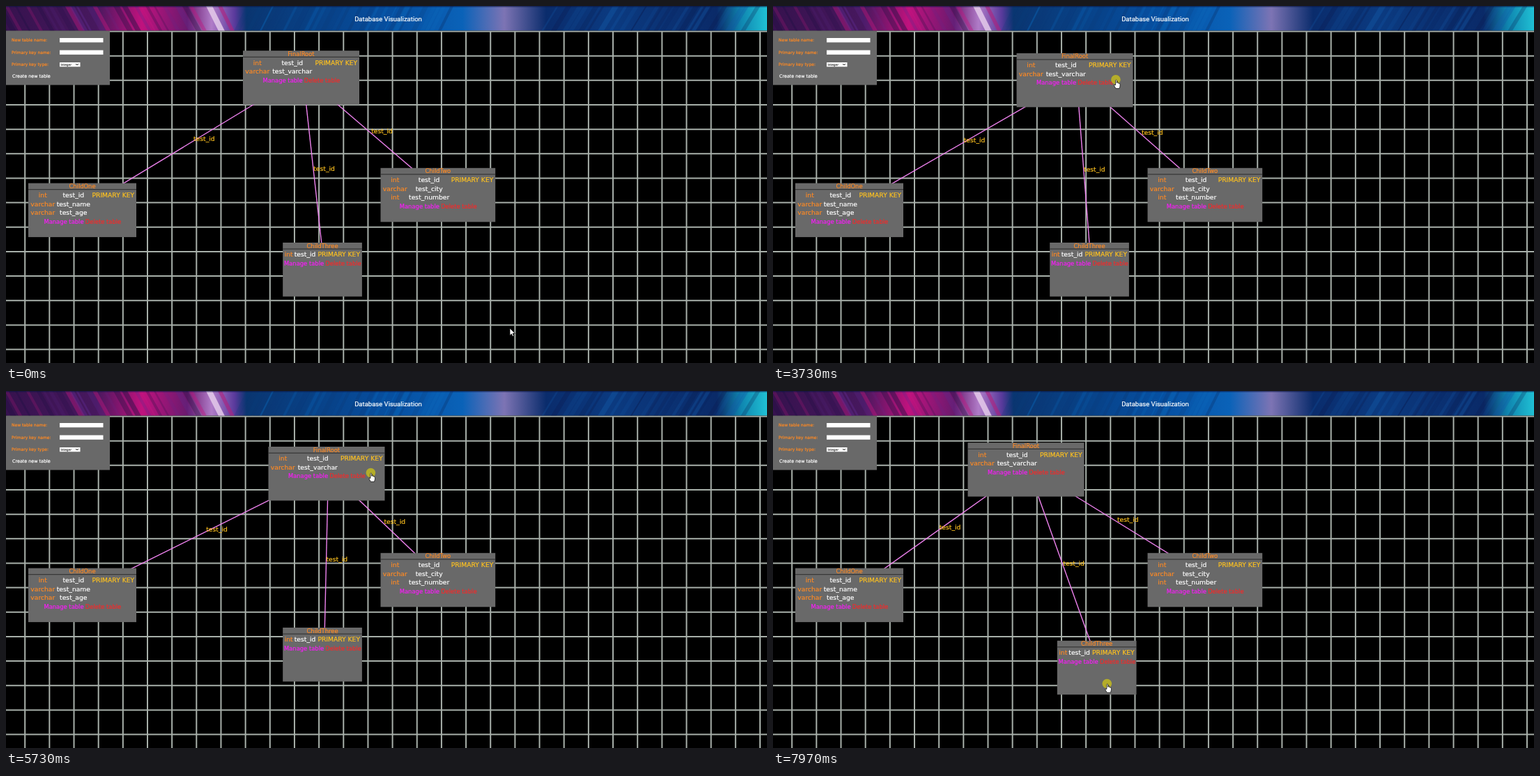
Recreate the animation shown at these times as an HTML page. Size 1092 by 513 pixels, loop 8 s.

```html
<!DOCTYPE html>
<html lang="en">
<head>
<meta charset="utf-8">
<title>Database Visualization</title>
<style>
  html, body { margin: 0; width: 100%; height: 100%; overflow: hidden; background: #000; }
  svg { display: block; width: 1092px; height: 513px; font: 9.2px "DejaVu Sans", sans-serif; }
  text { stroke-width: 0.2px; }
  .title { font: 9.5px Roboto, sans-serif; }
  .small { font-size: 6px; }
  .create { font-size: 6.4px; }
  .option { font-size: 4.3px; }
  .head, .button { font-size: 8.4px; }
  .mid { text-anchor: middle; }
</style>
</head>
<body>
<svg id="stage" viewBox="0 0 1092 513"></svg>
<script>
const NS = 'http://www.w3.org/2000/svg';
const LOOP = 8000, STEP = 70, HEIGHT = 77.5;
const ORANGE = '#ff8a24', GOLD = '#ffc21f', GREY = '#696969';
const stage = document.getElementById('stage');

function add(parent, tag, attrs = {}, text) {
  const el = document.createElementNS(NS, tag);
  for (const k in attrs) el.setAttribute(k, attrs[k]);
  if (text) el.textContent = text;
  parent.append(el);
  return el;
}
const rect = (p, x, y, width, height, fill, more) =>
  add(p, 'rect', { x, y, width, height, fill, ...more });
const label = (p, x, y, text, fill, cls = 'mid') =>
  add(p, 'text', { x, y, fill, stroke: fill, class: cls }, text);

function drawGrid() {
  const gap = 35.16;
  let d = '';
  for (let x = 27.2; x < 1092; x += gap) d += `M${x} 36V513`;
  for (let y = 36.5; y < 513; y += gap) d += `M0 ${y}H1092`;
  add(stage, 'path', { d, stroke: '#a8b0aa', 'stroke-width': 2 });
}

function drawBanner() {
  const stops = {
    0: '#36124e', 130: '#47185e', 195: '#c0127e', 260: '#6a1a6e', 295: '#b07cc8',
    328: '#5a3a9c', 345: '#0a3570', 560: '#0650a2', 655: '#0a62b8', 715: '#7d74b4',
    775: '#0a2c6c', 870: '#0b3a80', 1020: '#0a2a68', 1055: '#0f86b0', 1092: '#20c0d4'
  };
  const defs = add(stage, 'defs');
  const grad = add(defs, 'linearGradient', { id: 'sky' });
  for (const x in stops) add(grad, 'stop', { offset: x / 1092, 'stop-color': stops[x] });
  rect(add(defs, 'clipPath', { id: 'top' }), 0, 0, 1092, 35.6);
  const g = add(stage, 'g', { 'clip-path': 'url(#top)' });
  rect(g, 0, 0, 1092, 35.6, 'url(#sky)');

  const streak = (x, w, lean, fill, opacity) =>
    add(g, 'path', { d: `M${x} 0h${w}l${lean} 36h${-w}z`, fill, opacity });
  let seed = 11;
  const rnd = () => (seed = (seed * 16807) % 2147483647) / 2147483647;
  function scatter(from, to, lean, ...colors) {
    for (let x = from; x < to; x += 6 + rnd() * 12)
      streak(x, 2 + rnd() * 7, lean, colors[Math.floor(rnd() * colors.length)], 0.15 + rnd() * 0.3);
  }
  scatter(-20, 275, 20, '#c0187f', '#1b1040', '#5c2a8c');
  scatter(345, 650, -18, '#0a3a78', '#0a66b8');
  scatter(790, 1090, -22, '#0a1c50', '#1458a4');
  streak(287, 9, 18, '#e4cbea', 0.85);
  streak(304, 6, 18, '#b0207c', 0.6);
  rect(g, 0, 0, 1092, 1.5, '#0a1440', { opacity: 0.6 });
  label(stage, 548.5, 22.3, 'Database Visualization', '#fff', 'mid title');
}

function drawForm() {
  rect(stage, 0, 36, 149, 77.5, GREY);
  ['name', 'key name', 'key type'].forEach((text, i) => {
    const y = 46 + i * 17.5;
    label(stage, 8, y + 5, (i ? 'Primary ' : 'New table ') + text + ':', ORANGE, 'small');
    rect(stage, 77, y, i < 2 ? 62.5 : 29.5, 6.3, '#fff');
  });
  label(stage, 78.5, 85.8, 'Integer', '#555', 'option');
  add(stage, 'path', { d: 'M100.2 83l1.8 1.9 1.8-1.9', fill: 'none', stroke: '#111' });
  label(stage, 9, 102.7, 'Create new table', '#fff', 'create');
}

const tables = {
  root: { name: 'FinalRoot', w: 167, rows: ['int test_id', 'varchar test_varchar'] },
  one: { name: 'ChildOne', x: 32, y: 254.6, w: 155,
    rows: ['int test_id', 'varchar test_name', 'varchar test_age'] },
  two: { name: 'ChildTwo', x: 537.5, y: 232.8, w: 164.7,
    rows: ['int test_id', 'varchar test_city', 'int test_number'] },
  three: { name: 'ChildThree', w: 113.7, rows: ['int test_id'] }
};

function drawTable(t) {
  const g = t.el = add(stage, 'g');
  const mid = t.w / 2;
  const typeX = t.rows.length > 1 ? 20.8 : 8.5;
  const nameX = typeX + t.w / 2 - 33.5;
  rect(g, 0, 0, t.w, HEIGHT, GREY);
  rect(g, 0, 8.6, t.w, 1, '#2c2c2c');
  label(g, mid, 7.6, t.name, ORANGE, 'mid head');
  label(g, t.w - 33.2, 20.4, 'PRIMARY KEY', GOLD);
  let y = 20.4;
  for (const row of t.rows) {
    const [type, name] = row.split(' ');
    label(g, typeX, y, type, ORANGE);
    label(g, nameX, y, name, '#fff');
    y += 12.6;
  }
  label(g, mid - 26.5, y - 0.2, 'Manage table', '#f81cf8', 'mid button');
  label(g, mid + 30, y - 0.2, 'Delete table', '#f52a2a', 'mid button');
}

drawGrid();
const links = ['one', 'two', 'three'].map(key => ({
  to: tables[key],
  line: add(stage, 'line', { stroke: '#ee82ee', 'stroke-width': 1.4 }),
  text: label(stage, 0, 0, 'test_id', GOLD, '')
}));
drawBanner();
drawForm();
Object.values(tables).forEach(drawTable);

const press = add(stage, 'circle', { r: 6.8, fill: '#c4bc1c', opacity: 0.82 });
const ink = { fill: '#fff', stroke: '#000', 'stroke-width': 0.7, 'stroke-linejoin': 'round' };
const arrow = add(stage, 'path', { d: 'M0 0V10.4L2.4 8.2L4 11.8L5.7 11L4.2 7.6H7.4Z', ...ink });
const hand = add(stage, 'path', {
  d: 'M-.9 .8Q0-.6 .9 .8V4.6Q2 0 2.7 4.9Q3.8 4.2 4.2 5.4Q5.6 5 5.6 6.6V9.2L4.6 12.6H-.5L-2.8 8.6Q-3.2 6.7-.9 7.6Z',
  ...ink
});

// Turning points: time, x, y
const DRAG = 2310, DROP = 6160, GRAB = 6980;
const rootPath = [
  [DRAG, 340, 64.2], [3500, 372, 66.4], [4200, 263, 73.5], [4760, 373, 71.6],
  [5380, 243, 58], [5670, 376.5, 80], [DROP, 279.5, 74.2]
];
const threePath = [[7050, 397.2, 340], [7560, 411.5, 355], [7910, 407.8, 358.8]];
const approach = [
  [70, 723, 463], [890, 613, 276], [1230, 397, 193], [1300, 415, 189],
  [1430, 415, 189], [2240, 488.5, 102.2]
];
const crossing = [[DROP, 427.5, 112], [6650, 490, 343], [GRAB, 469.2, 402]];

// Eased travel from one turning point to the next
function along(keys, t) {
  const next = keys.findIndex(k => k[0] > t);
  if (next === 0) return keys[0].slice(1);
  if (next < 0) return keys[keys.length - 1].slice(1);
  const [t0, x0, y0] = keys[next - 1], [t1, x1, y1] = keys[next];
  const v = (1 - Math.cos(Math.PI * (t - t0) / (t1 - t0))) / 2;
  return [x0 + (x1 - x0) * v, y0 + (y1 - y0) * v];
}

// A dragged table trails the pointer a little
function pulling(path, t, dx, dy) {
  const [x, y] = along(path, t + 25);
  return [x + dx, y + dy];
}

function pointer(t) {
  if (t < DRAG) return along(approach, t);
  if (t < DROP) return pulling(rootPath, t, 148, 37.8);
  if (t < GRAB) return along(crossing, t);
  return pulling(threePath, t, 72, 62);
}

const anchor = t => [t.x + t.w / 2 + 2.5, t.y + HEIGHT / 2 - 4.2];
const move = (el, x, y) => el.setAttribute('transform', `translate(${x.toFixed(2)} ${y.toFixed(2)})`);
const show = (el, on) => el.setAttribute('visibility', on ? 'visible' : 'hidden');

function draw(time) {
  const t = time - time % STEP;
  const { root, three } = tables;
  [root.x, root.y] = along(rootPath, t);
  [three.x, three.y] = along(threePath, t);
  for (const table of Object.values(tables)) move(table.el, table.x, table.y);

  const [x1, y1] = anchor(root);
  for (const { to, line, text } of links) {
    const [x2, y2] = anchor(to);
    Object.entries({ x1, y1, x2, y2 }).forEach(([k, v]) => line.setAttribute(k, v));
    move(text, (x1 + x2) / 2, (y1 + y2) / 2);
  }

  const [x, y] = pointer(t);
  const over = Object.values(tables).some(b =>
    x > b.x && x < b.x + b.w && y > b.y && y < b.y + HEIGHT);
  for (const el of [arrow, hand]) move(el, x, y);
  move(press, x - 0.5, y - 0.3);
  show(arrow, !over);
  show(hand, over);
  show(press, (t >= DRAG && t < DROP) || t >= GRAB);
}

const start = performance.now();
function tick(now) {
  draw(Math.max(0, now - start) % LOOP);
  requestAnimationFrame(tick);
}
draw(0);
requestAnimationFrame(tick);
</script>
</body>
</html>
```
